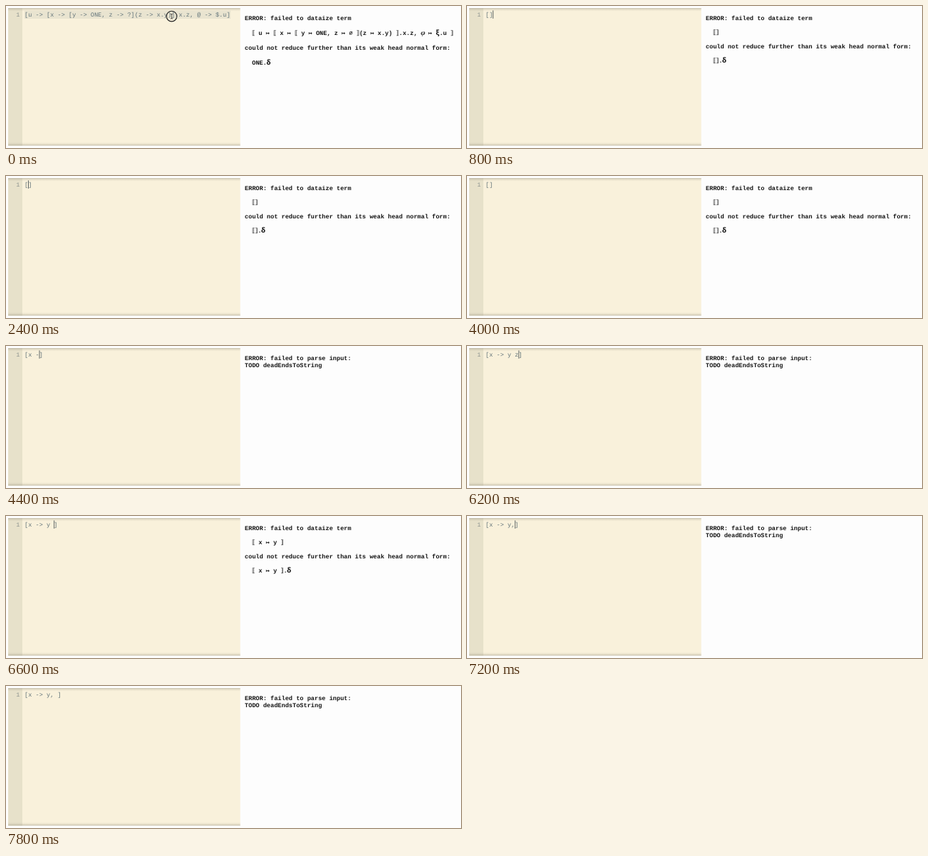
Animation of 640 by 201 pixels, one loop 8 s. Source, as an HTML page:

```html
<!DOCTYPE html>
<html lang="en">
<head>
<meta charset="utf-8">
<title>Term editor</title>
<style>
  html, body { margin: 0; width: 100%; height: 100%; overflow: hidden; background: #fdfdfd; }
  svg { display: block; width: 100vw; height: 100vh; }
  text {
    font: 8.62px "Liberation Mono", "DejaVu Sans Mono", monospace;
    white-space: pre;
    text-rendering: geometricPrecision;
    font-variant-ligatures: none;
  }
  #code { fill: #64757a; }
  #lineNumber { fill: #8f9690; }
  #output text { font-weight: 700; fill: #151515; }
  .glyph { text-anchor: middle; }
  .bracket { font-family: "DejaVu Sans", sans-serif; }
  .symbol { font-family: "DejaVu Sans Mono", monospace; }
  .greek { font-family: "Noto Sans", "DejaVu Sans", sans-serif; font-size: 10px; font-weight: 600; }
  .phi { font-family: "Noto Serif", "DejaVu Sans", serif; font-style: italic; }
</style>
</head>
<body>
<svg viewBox="0 0 640 201" preserveAspectRatio="none">
  <defs>
    <linearGradient id="edge" x2="0" y2="1">
      <stop offset="0" stop-color="#8a8470" stop-opacity=".5"/>
      <stop offset=".4" stop-color="#8a8470" stop-opacity=".16"/>
      <stop offset="1" stop-color="#8a8470" stop-opacity="0"/>
    </linearGradient>
  </defs>

  <rect x="3" y="3" width="326.5" height="194.5" fill="#f9f1db"/>
  <rect x="3" y="3" width="20" height="194.5" fill="#e7e1ca"/>
  <rect id="shade" x="3" y="3" width="326.5" height="4.5" fill="url(#edge)"/>
  <use href="#shade" transform="matrix(1 0 0 -1 0 200.5)"/>

  <rect id="selection" x="26" y="6.5" width="290" height="11.5" fill="#e9e4d0"/>
  <text id="lineNumber" x="14.2" y="15.4">1</text>
  <text id="code" x="26" y="15.4"></text>
  <rect id="caret" y="6.3" width=".9" height="11.5" fill="#4c5557"/>

  <g id="pointer" fill="none" stroke="#222">
    <circle cx="233" cy="14.6" r="7.3" stroke-width="1.1"/>
    <path d="M231.4 11.2Q233 11.2 233 12.2V17.2Q233 18.2 231.4 18.2M234.6 11.2Q233 11.2 233 12.2M234.6 18.2Q233 18.2 233 17.2" stroke-width=".8"/>
  </g>

  <g id="output"></g>
</svg>

<script>
const LOOP = 8000;
const ADVANCE = 5.173;
const BRACKET_ADVANCE = 4.1;
const CODE_X = 26;
const MARGIN = 335.8;
const INDENT = 346;

const el = id => document.getElementById(id);
const show = (node, visible) => node.setAttribute("visibility", visible ? "visible" : "hidden");

const glyphClass = c =>
  "⟦⟧".includes(c) ? "bracket" :
  "δξ".includes(c) ? "greek" :
  c === "φ" ? "phi" : "symbol";

// Symbols missing from the text face are centred in their own cells.
function line(str, x, y) {
  const runs = str.split(/([⟦⟧↦∅δξφ])/).map((run, i) => {
    if (!run) return "";
    const start = x;
    if (i % 2 === 0) {
      x += run.length * ADVANCE;
      return `<tspan x="${start}">${run}</tspan>`;
    }
    const advance = "⟦⟧".includes(run) ? BRACKET_ADVANCE : ADVANCE;
    x += advance;
    return `<tspan class="glyph ${glyphClass(run)}" x="${start + advance / 2}">${run}</tspan>`;
  });
  return `<text y="${y}">${runs.join("")}</text>`;
}

const stuck = (term, reduced, [y1, y2, y3]) =>
  line("ERROR: failed to dataize term", MARGIN, 19.7) +
  line(term, INDENT, y1) +
  line("could not reduce further than its weak head normal form:", MARGIN, y2) +
  line(reduced, INDENT, y3);

const nested = stuck(
  "⟦ u ↦ ⟦ x ↦ ⟦ y ↦ ONE, z ↦ ∅ ⟧(z ↦ x.y) ⟧.x.z, φ ↦ ξ.u ⟧",
  "ONE.δ", [41, 62.3, 82.7]);
const empty = stuck("⟦⟧", "⟦⟧.δ", [39.8, 60, 80.1]);
const bound = stuck("⟦ x ↦ y ⟧", "⟦ x ↦ y ⟧.δ", [40.3, 60.3, 80.4]);
const unparsed =
  line("ERROR: failed to parse input:", MARGIN, 19.7) +
  line("TODO deadEndsToString", MARGIN, 29.9);

const HIDDEN = -1;
const FULL = "[u -> [x -> [y -> ONE, z -> ?](z -> x.y)].x.z, @ -> $.u]";

// start time, code, caret column, output
const steps = [
  [0, FULL, HIDDEN, nested],
  [800, "[]", 2, empty],
  [1400, "[]", 1, empty],
  [2000, "[]", HIDDEN, empty],
  [2400, "[]", 1, empty],
  [3000, "[]", HIDDEN, empty],
  [3600, "[]", 1, empty],
  [4000, "[]", HIDDEN, empty],
  [4200, "[x]", 2, unparsed],
  [4400, "[x -]", 4, unparsed],
  [5000, "[x -]", HIDDEN, unparsed],
  [5400, "[x -]", 4, unparsed],
  [5600, "[x ->]", 5, unparsed],
  [5800, "[x -> ]", 6, unparsed],
  [6000, "[x -> y ]", 8, bound],
  [6200, "[x -> y z]", 9, unparsed],
  [6600, "[x -> y ]", 8, bound],
  [7000, "[x -> y]", 7, bound],
  [7200, "[x -> y,]", 8, unparsed],
  [7400, "[x -> y, ]", 9, unparsed],
  [7800, "[x -> y, ]", HIDDEN, unparsed],
];

let current;

function render() {
  const t = performance.now() % LOOP;
  const step = steps.findLast(([start]) => start <= t);
  show(el("pointer"), t < 200);
  if (step !== current) {
    current = step;
    const [, code, column, output] = step;
    el("code").textContent = code;
    el("caret").setAttribute("x", CODE_X + column * ADVANCE - 0.1);
    show(el("caret"), column !== HIDDEN);
    show(el("selection"), code === FULL);
    el("output").innerHTML = output;
  }
  requestAnimationFrame(render);
}
render();
</script>
</body>
</html>
```
